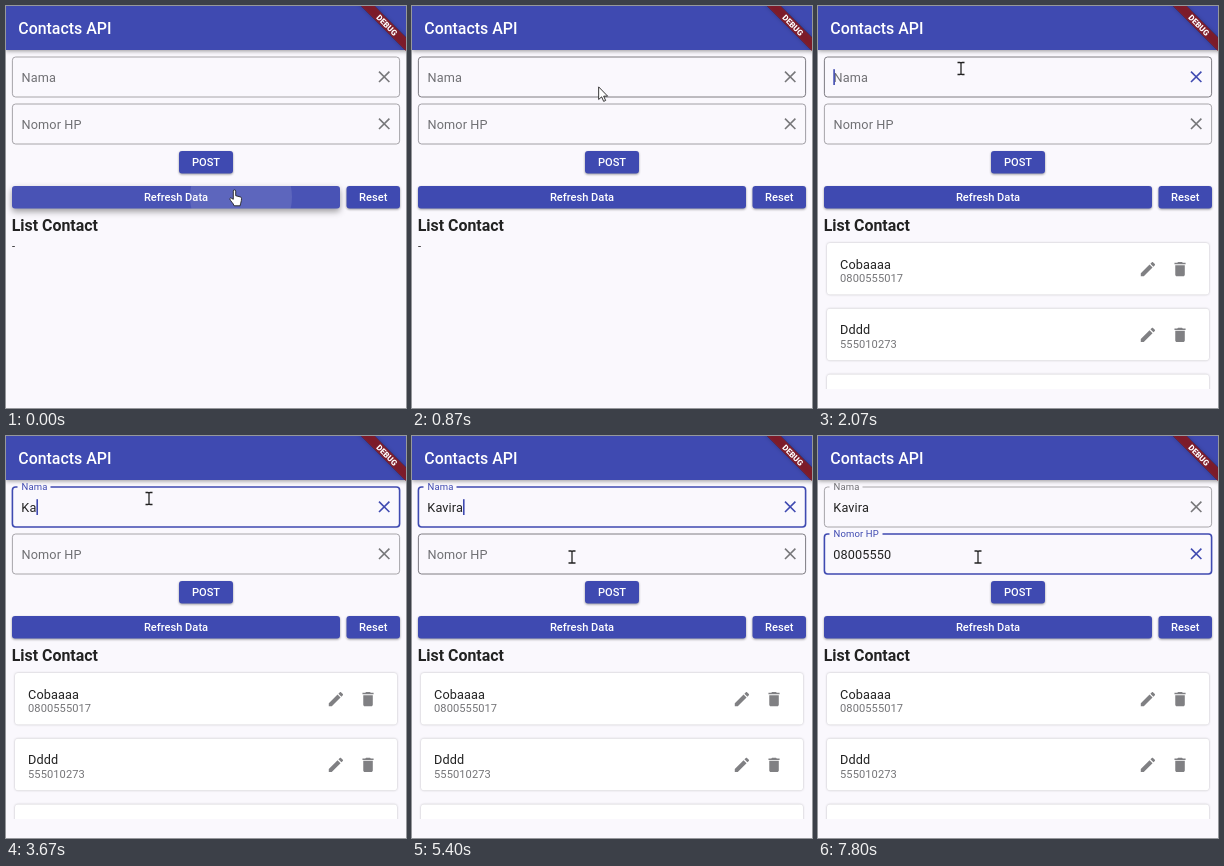
Recreate the animation shown at these times as an HTML page. Size 400 by 402 pixels, loop 8000 ms.

```html
<!DOCTYPE html>
<html lang="id">
<head>
<meta charset="utf-8">
<title>Contacts API</title>
<style>
  html, body { margin: 0; width: 100%; height: 100%; overflow: hidden; background: #faf8fd; }
  svg { display: block; width: 400px; height: 402px; font-family: Roboto, Arial, sans-serif; }
  text { white-space: pre; }
  .bar { fill: #3f4ab1; filter: drop-shadow(0 1.5px 2px rgba(0,0,0,.4)); }
  .btn { fill: #3f4ab1; filter: drop-shadow(0 1.2px 1.2px rgba(0,0,0,.38)); }
  .btn-text { fill: #fff; font-size: 11.1px; font-weight: 500; text-anchor: middle; }
  .card { fill: #fff; filter: drop-shadow(0 .8px .9px rgba(0,0,0,.25)); }
  .body { font-size: 12.7px; letter-spacing: .12px; fill: #222; }
  .sub { font-size: 11.1px; letter-spacing: .08px; fill: #757578; }
  .icon { fill: #808083; }
  .caret { fill: #3f4ab1; }
</style>
</head>
<body>
<svg id="stage" viewBox="0 0 400 402">
  <defs>
    <clipPath id="listClip"><rect y="228" width="400" height="155"/></clipPath>
    <clipPath id="btnClip"><rect x="6" y="180" width="328" height="22.5" rx="3"/></clipPath>
  </defs>
  <rect width="400" height="402" fill="#faf8fd"/>
  <rect class="bar" width="400" height="44"/>
  <text x="12.3" y="27.5" font-size="15.9" font-weight="500" fill="#fff">Contacts API</text>
  <g id="fields"></g>
  <g id="buttons"></g>
  <g clip-path="url(#btnClip)" fill="#fff">
    <rect id="hover" x="6" y="180" width="328" height="23"/>
    <circle id="ripple" cy="191"/>
  </g>
  <g id="captions"></g>
  <text x="5.7" y="224.5" font-size="15.9" font-weight="700" fill="#222">List Contact</text>
  <text id="empty" x="6" y="244" font-size="11.1" fill="#222">-</text>
  <g id="list" clip-path="url(#listClip)"></g>
  <g transform="translate(400 0) rotate(45)">
    <rect x="-50" y="22.2" width="100" height="9.6" fill="rgba(0,0,0,.5)" style="filter:drop-shadow(0 0 2px rgba(0,0,0,.5))"/>
    <rect x="-50" y="22.2" width="100" height="9.6" fill="rgba(183,28,28,.63)"/>
    <text y="29.9" font-size="8.1" font-weight="900" fill="#fff" text-anchor="middle">DEBUG</text>
  </g>
  <g id="cursor" stroke="#222" stroke-width=".9" stroke-linejoin="round" fill="#fff">
    <path id="hand" transform="translate(-4.8 -.5)" d="M3.6 9.8V1.6a1.2 1.2 0 0 1 2.4 0V6.2l4.6 1.2a1.6 1.6 0 0 1 1.2 1.6c0 3-.8 4-1.4 7.3H4.4C3.6 13.5 1 12 .2 9.6c-.4-1 .9-1.5 1.6-.8z"/>
    <path id="arrow" d="M0 0V12.6L3 10L5 14.5L7 13.6L5 9.3H9Z"/>
    <path id="beam" fill="none" stroke-width="1.3" d="M-3.5-6H-1Q0-6 0-5Q0-6 1-6H3.5M0-5V5M-3.5 6H-1Q0 6 0 5Q0 6 1 6H3.5"/>
  </g>
</svg>
<script>
const LOOP = 8000;
const BLUE = [63, 74, 177], GREY = [156, 154, 160], DARK = [112, 110, 116], LABEL = [112, 112, 116];
const $ = id => document.getElementById(id);
const clamp = v => Math.min(1, Math.max(0, v));
const ramp = (t, start, dur) => clamp((t - start) / dur);
const ease = p => p * p * (3 - 2 * p);
const mix = (a, b, p) => a + (b - a) * p;
const blend = (a, b, p) => `rgb(${a.map((v, i) => Math.round(mix(v, b[i], p)))})`;
const within = (t, spans) => spans.some(([a, b]) => t >= a && t < b);

function add(parent, tag, attrs, text) {
  const el = document.createElementNS('http://www.w3.org/2000/svg', tag);
  set(el, attrs);
  if (text) el.textContent = text;
  return parent.appendChild(el);
}
function set(el, attrs) {
  for (const k in attrs) el.setAttribute(k, attrs[k]);
}
const show = (el, on) => set(el, { visibility: on ? 'visible' : 'hidden' });

// Text fields: typed holds [time, letters shown]
const fields = [
  { y: 51, label: 'Nama', gap: 33, value: 'Kavira',
    typed: [[3670, 2], [3800, 3], [3930, 4], [4130, 5], [4330, 6]],
    caretOn: [[1930, 3400], [3670, 5600]],
    hover: [[680, 5050]], icon: [1800, 5600], focus: [3000, 5600] },
  { y: 98, label: 'Nomor HP', gap: 53, value: '08005550',
    typed: [[6330, 1], [6530, 2], [6600, 3], [6730, 4], [7130, 5], [7470, 7], [7730, 8]],
    caretOn: [[5730, 7800]],
    hover: [[430, 740], [5130, LOOP]], icon: [5600, 9000], focus: [5600, 9000] }
];
for (const f of fields) {
  const g = $('fields');
  f.box = add(g, 'rect', { x: 6.4, y: f.y, width: 387.2, height: 40, rx: 3.2, fill: 'none' });
  f.notch = add(g, 'rect', { x: 11.5, y: f.y - 1.5, height: 3, fill: '#faf8fd' });
  f.tag = add(g, 'text', { x: 15.5, 'letter-spacing': .12 }, f.label);
  f.text = add(g, 'text', { class: 'body', x: 15.3, y: f.y + 24.5 });
  f.caret = add(g, 'rect', { class: 'caret', y: f.y + 12.2, width: 1.6, height: 15.8 });
  f.cross = add(g, 'path', { d: `M373 ${f.y + 14.6}l10.4 10.4m0-10.4l-10.4 10.4`, 'stroke-width': 1.6 });
}

const buttons = [['POST', 173, 145, 54], ['Refresh Data', 6, 180, 328], ['Reset', 340.5, 180, 53.5]]
  .map(([name, x, y, width]) => {
    const rect = add($('buttons'), 'rect', { class: 'btn', x, y, width, height: 22.5, rx: 3 });
    add($('captions'), 'text', { class: 'btn-text', x: x + width / 2, y: y + 15.3 }, name);
    return rect;
  });

const PEN = 'M3 17.25V21h3.75L17.81 9.94l-3.75-3.75zM20.71 7.04c.39-.39.39-1.02 0-1.41l-2.34-2.34c-.39-.39-1.02-.39-1.41 0l-1.83 1.83 3.75 3.75z';
const BIN = 'M6 19c0 1.1.9 2 2 2h8c1.1 0 2-.9 2-2V7H6zM19 4h-3.5l-1-1h-5l-1 1H5v2h14z';
[['Cobaaaa', '0800555017'], ['Dddd', '555010273'], ['', '']].forEach(([name, phone], i) => {
  const g = add($('list'), 'g', { transform: `translate(0 ${237 + i * 65.7})` });
  add(g, 'rect', { class: 'card', x: 9, width: 382, height: 51.5, rx: 3 });
  if (!name) return;
  add(g, 'text', { class: 'body', x: 22, y: 25.7 }, name);
  add(g, 'text', { class: 'sub', x: 22, y: 39 }, phone);
  add(g, 'path', { class: 'icon', d: PEN, transform: 'translate(320.4 16.6) scale(.794)' });
  add(g, 'path', { class: 'icon', d: BIN, transform: 'translate(352.5 16.6) scale(.794)' });
});

const path = [[0, 228.5, 184], [70, 228.5, 184], [900, 186.5, 80.5], [1200, 143, 62.5],
  [4870, 143, 62.5], [5330, 160, 121], [LOOP, 160, 121]];

function pointer(t) {
  const i = path.findIndex(k => k[0] > t);
  const a = path[i - 1], b = path[i], p = ease(ramp(t, a[0], b[0] - a[0]));
  return [mix(a[1], b[1], p), mix(a[2], b[2], p)];
}

function drawField(f, t) {
  const float = ease(ramp(t, f.focus[0], 200));
  const focus = float * (1 - ease(ramp(t, f.focus[1], 200)));
  const over = Math.max(...f.hover.map(([a, b]) => ramp(t, a, 150) * (1 - ramp(t, b, 150))));
  const edge = GREY.map((v, i) => mix(v, DARK[i], over));
  set(f.box, { stroke: blend(edge, BLUE, focus), 'stroke-width': mix(.9, 1.6, focus) });
  set(f.notch, { width: f.gap * float });
  set(f.tag, { y: f.y + mix(24.5, 3, float), 'font-size': mix(12.7, 9.5, float), fill: blend(LABEL, BLUE, focus) });
  const count = f.typed.reduce((n, [at, len]) => t >= at ? len : n, 0);
  f.text.textContent = f.value.slice(0, count);
  set(f.caret, { x: 15.3 + (count ? f.text.getComputedTextLength() : 0) });
  show(f.caret, within(t, f.caretOn));
  set(f.cross, { stroke: within(t, [f.icon]) ? blend(BLUE, BLUE, 0) : '#77777a' });
}

function render(t) {
  fields.forEach(f => drawField(f, t));

  const lift = 1 - ease(ramp(t, 70, 250));
  buttons[1].style.filter =
    `drop-shadow(0 ${mix(1.2, 3.5, lift)}px ${mix(1.2, 3, lift)}px rgba(0,0,0,.38))`;
  set($('hover'), { opacity: .05 * lift });
  set($('ripple'), { cx: 235, r: mix(51, 230, ramp(t, 70, 300)), opacity: .11 * (1 - ramp(t, 70, 350)) });

  const loaded = t >= 1200;
  show($('empty'), !loaded);
  show($('list'), loaded);

  const [x, y] = pointer(t);
  const onButton = y > 180 || (y > 145 && y < 167.5);
  const onField = y < 91 || y > 98;
  const kind = t < 930 ? (onButton ? 'hand' : 'arrow') : (onField ? 'beam' : 'arrow');
  set($('cursor'), { transform: `translate(${x} ${y})` });
  for (const id of ['hand', 'arrow', 'beam']) show($(id), id === kind);
}

const start = performance.now();
function tick() {
  render((performance.now() - start) % LOOP);
  requestAnimationFrame(tick);
}
tick();
</script>
</body>
</html>
```
